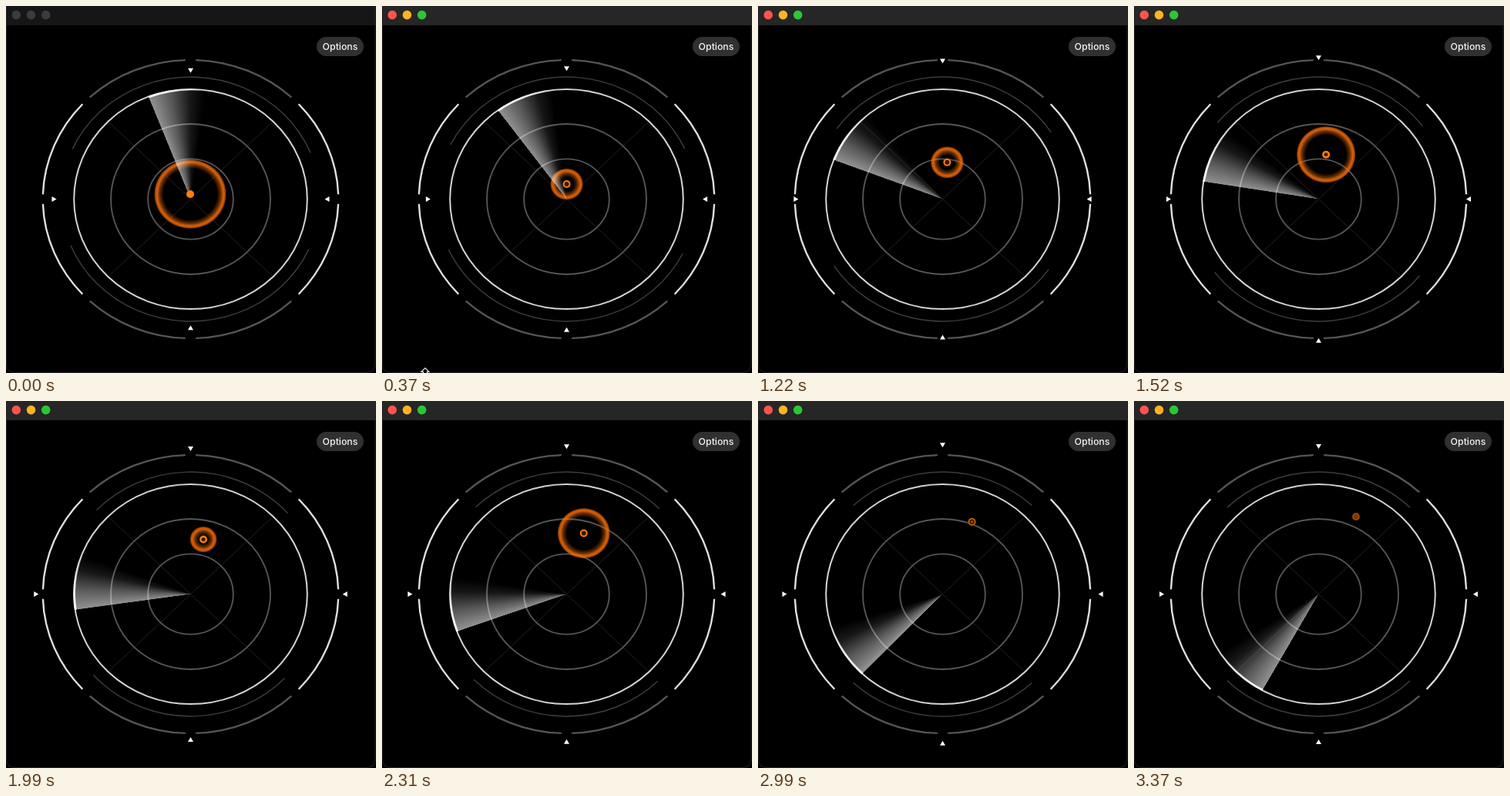
Write an HTML page with a canvas that moves like this. It is 480 px wide and 476 px high and loops after 3430 ms.

```html
<!DOCTYPE html>
<html lang="en">
<head>
<meta charset="utf-8">
<title>Radar</title>
<style>
  html, body { margin: 0; width: 100%; height: 100%; overflow: hidden; background: #000; }
  #stage { position: relative; width: 480px; height: 476px; overflow: hidden; }
  canvas { display: block; width: 480px; height: 476px; }
  #options {
    position: absolute; left: 403px; top: 40px; width: 61px; height: 25px;
    border-radius: 13px; background: #303030; color: #f4f4f4;
    font: 500 12.3px/25px Inter, sans-serif; text-align: center;
  }
</style>
</head>
<body>
<div id="stage">
  <canvas id="view"></canvas>
  <div id="options">Options</div>
</div>
<script>
const LOOP = 3430, CX = 239.5, CY = 250.5, SQUASH = 0.942, RIPPLE = 845;
const RAD = Math.PI / 180;
const canvas = document.getElementById('view');
const dpr = window.devicePixelRatio || 1;
canvas.width = 480 * dpr;
canvas.height = 476 * dpr;
const c = canvas.getContext('2d');

// The picture advances in short bursts of seven even steps.
const bursts = [[70, 520], [610, 1070], [1140, 1610], [1690, 2140], [2220, 2690], [2760, 3220]];
const ticks = [0];
for (const [a, b] of bursts)
  for (let i = 0; i < 7; i++) ticks.push(a + (b - a) * i / 6);
ticks.push(3310, 3370);

const times = [0, 370, 920, 1520, 1990, 2610, 3370];
const sweepAngle = [21.2, 36.1, 57.9, 80.4, 98.2, 121.7, 151.2];
const blipY = [244, 231, 212.5, 193, 179.5, 163.5, 150];

function track(values, t) {
  let i = 0;
  while (i < times.length - 2 && t > times[i + 1]) i++;
  const k = (t - times[i]) / (times[i + 1] - times[i]);
  return values[i] + (values[i + 1] - values[i]) * k;
}

function snap(t) {
  let now = 0;
  for (const tick of ticks) if (tick <= t + 12) now = tick;
  return now;
}

const clamp = x => Math.max(0, Math.min(1, x));
const orange = a => `rgba(255,112,8,${a})`;

function arc(r, from, to, color, width) {
  c.beginPath();
  c.arc(0, 0, r, from * RAD, to * RAD);
  c.strokeStyle = color;
  c.lineWidth = width;
  c.stroke();
}

function disc(x, y, r, color) {
  c.beginPath();
  c.arc(x, y, r, 0, 7);
  c.fillStyle = color;
  c.fill();
}

function drawWindow(active) {
  c.fillStyle = '#000';
  c.fillRect(0, 0, 480, 476);
  c.fillStyle = active ? '#262626' : '#161616';
  c.fillRect(0, 0, 480, 25);
  const lights = active ? ['#ff544d', '#ffb224', '#2ac833'] : ['#3b3b3b', '#3b3b3b', '#3b3b3b'];
  lights.forEach((color, i) => disc(13.3 + 19.2 * i, 11.6, 5.8, color));
  c.beginPath();
  c.roundRect(0.5, -12, 478.5, 487.5, 10);
  c.strokeStyle = '#262626';
  c.lineWidth = 1;
  c.stroke();
}

function drawDial(open) {
  const d = 151.3 * Math.SQRT1_2;
  c.beginPath();
  c.moveTo(-d, -d); c.lineTo(d, d);
  c.moveTo(d, -d); c.lineTo(-d, d);
  c.strokeStyle = '#232323';
  c.lineWidth = 1;
  c.stroke();
  arc(55.3, 0, 360, '#555', 1.9);
  arc(103.5, 0, 360, '#555', 1.9);
  arc(151.3, 0, 360, '#d4d4d4', 2);
  for (let q = 0; q < 360; q += 45) {
    const bright = [0, 135, 180, 315].includes(q);
    arc(191.7, q + 2, q + 43, bright ? '#e0e0e0' : '#555', 2.4);
  }
  arc(168.2, 180 + open.low, 360 - open.high, '#3c3c3c', 1.5);
  arc(168.2, open.low, 180 - open.high, '#3c3c3c', 1.5);
}

function drawSweep(angle) {
  const lead = (-90 - angle) * RAD, span = 29;
  const fade = stops => {
    const g = c.createConicGradient(lead, 0, 0);
    for (const [deg, a] of stops) g.addColorStop(deg / 360, `rgba(255,255,255,${a})`);
    g.addColorStop(1, 'rgba(255,255,255,0)');
    return g;
  };
  c.beginPath();
  c.moveTo(0, 0);
  c.arc(0, 0, 151, lead, lead + span * RAD);
  c.closePath();
  c.fillStyle = fade([[0, 0.57], [11, 0.34], [21, 0.09], [span, 0]]);
  c.fill();
  arc(150.8, -90 - angle, -90 - angle + span, fade([[0, 1], [14, 0.7], [span, 0]]), 2.7);
}

function drawRipple(x, y, age, alpha) {
  const r = 5 + 0.0535 * age;
  if (alpha <= 0 || r < 7) return;
  c.save();
  c.translate(x, y);
  c.scale(1, 0.96);
  const edge = k => clamp(k / r);
  const g = c.createRadialGradient(0, 0, 0, 0, 0, r);
  g.addColorStop(edge(r - 12), orange(0));
  g.addColorStop(edge(r - 7), orange(0.4 * alpha));
  g.addColorStop(edge(r - 3.5), orange(0.86 * alpha));
  g.addColorStop(edge(r - 1.5), orange(0.7 * alpha));
  g.addColorStop(1, orange(0.25 * alpha));
  disc(0, 0, r, g);
  c.restore();
}

function drawBlip(x, y, age, alpha, fading) {
  const hole = Math.max(3.3 * Math.sin(Math.PI * age / RIPPLE), fading ? 2 : 0);
  disc(x, y, 5.2, '#000');
  disc(x, y, 5, `rgba(255,128,16,${alpha})`);
  if (hole > 1.4) {
    disc(x, y, hole, '#3a1800');
    if (fading) disc(x, y, 1.2, `rgba(255,128,16,${alpha})`);
  }
}

function drawPointers(dist) {
  c.fillStyle = '#fff';
  for (let i = 0; i < 4; i++) {
    const k = i % 2 ? SQUASH : 1;
    c.save();
    c.translate(CX, CY);
    c.rotate(i * 90 * RAD);
    c.translate(dist * k, 0);
    c.beginPath();
    c.moveTo(-3, 0); c.lineTo(3, -3.5); c.lineTo(3, 3.5);
    c.fill();
    c.restore();
  }
}

function drawCursor() {
  c.beginPath();
  c.moveTo(53.5, 477); c.lineTo(53.5, 474.5); c.lineTo(51, 474.5);
  c.lineTo(56, 469.5);
  c.lineTo(61, 474.5); c.lineTo(58.5, 474.5); c.lineTo(58.5, 477);
  c.fillStyle = '#000';
  c.fill();
  c.strokeStyle = '#eee';
  c.lineWidth = 1.1;
  c.stroke();
}

function draw(t) {
  const wave = Math.cos(Math.PI * (t - 2860) / 3200);
  const gap = 22.6 + 12 * (1 + wave);
  const tilt = 1 - clamp((t - 1990) / 620);
  const x = 239 + 4.31e-6 * t * t;
  const y = track(blipY, t);
  const age = (t + 778) % RIPPLE;
  const fade = clamp((t - 2610) / 760);

  c.setTransform(dpr, 0, 0, dpr, 0, 0);
  drawWindow(t >= 70);
  c.save();
  c.translate(CX, CY);
  c.scale(1, SQUASH);
  drawDial({ low: gap + tilt, high: gap - tilt });
  c.restore();
  drawRipple(x, y, age, 1 - clamp(fade * 2));
  c.save();
  c.translate(CX, CY);
  c.scale(1, SQUASH);
  drawSweep(track(sweepAngle, t));
  c.restore();
  drawBlip(x, y, age, 1 - 0.45 * fade, t > 2580);
  drawPointers(190.7 + 14.5 * wave);
  if (t > 210 && t < 450) drawCursor();
}

const start = performance.now();
function loop() {
  draw(snap((performance.now() - start) % LOOP));
  requestAnimationFrame(loop);
}
loop();
</script>
</body>
</html>
```
